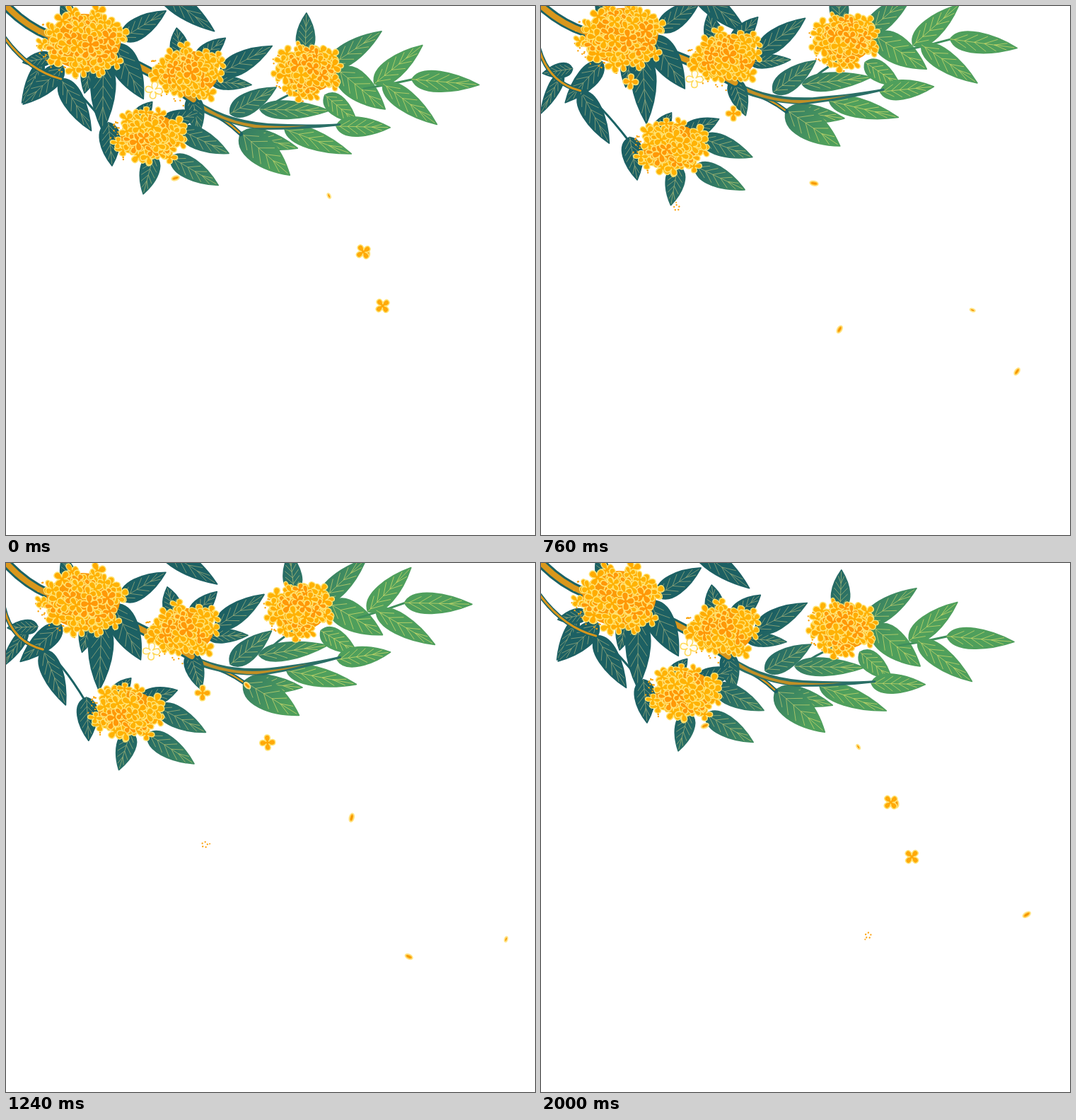
These frames come from a looping animation (748x748 px, 2.04 s). An HTML page:

```html
<!DOCTYPE html>
<html lang="en">
<head>
<meta charset="utf-8">
<title>Osmanthus</title>
<style>
html, body { margin: 0; width: 100%; height: 100%; overflow: hidden; background: #fff; }
svg { display: block; width: 100vw; height: 100vh; }
</style>
</head>
<body>
<svg id="stage" viewBox="0 0 748 748">
  <defs>
    <linearGradient id="leaf" gradientUnits="userSpaceOnUse" x1="200" y1="200" x2="305" y2="305">
      <stop offset="0" stop-color="#1c6063"/>
      <stop offset=".4" stop-color="#2e7465"/>
      <stop offset="1" stop-color="#4f9f5c"/>
    </linearGradient>
    <linearGradient id="vein" gradientUnits="userSpaceOnUse" x1="200" y1="200" x2="305" y2="305">
      <stop offset="0" stop-color="#91a578"/>
      <stop offset="1" stop-color="#c3d568"/>
    </linearGradient>
  </defs>
</svg>
<script>
const LOOP = 2040, STEP = 40, SWAY = 2000, SPIN = .18;
const TEAL = '#1b6264', GOLD = '#d9971c', PALE = '#ffe373', ORANGE = '#ffa908';
const RAD = Math.PI / 180;
const stage = document.getElementById('stage');

function add(parent, tag, attrs = {}) {
  const el = document.createElementNS('http://www.w3.org/2000/svg', tag);
  for (const k in attrs) el.setAttribute(k, attrs[k]);
  return parent.appendChild(el);
}

let seed = 7;
function rand(low = 0, high = 1) {
  seed = (seed * 16807) % 2147483647;
  return low + (high - low) * seed / 2147483647;
}

// Each joint turns by mean + swing * wave; a child's pivot rides on its parent.
// The growing phase makes the sway travel out along the branch.
const joints = {
  top: { x: 215, y: -25, mean: 0, swing: 4.8, phase: 85 },
  bough: { x: 0, y: 0, mean: -1.25, swing: 4.3, phase: 280 },
  middle: { parent: 'bough', x: 208, y: 121, mean: -4.1, swing: 4.5, phase: 340 },
  right: { parent: 'middle', x: 264, y: 134, mean: -4.8, swing: 5, phase: 380 },
  tip: { parent: 'right', x: 516, y: 114, mean: -3, swing: 4.1, phase: 408 },
  end: { parent: 'tip', x: 573, y: 106, mean: .4, swing: 4.6, phase: 448 },
  twig: { x: 78, y: 103, mean: 3, swing: 5.5, phase: 240, slide: [14, -10.5, 10] },
  low: { x: 207, y: 181, mean: -1.1, swing: 5.3, phase: 280, slide: [17.5, -15, 35] }
};
const wave = (t, phase) => Math.cos(2 * Math.PI * t / SWAY - phase * RAD);

// Where a point of a joint's resting drawing is now.
function on(name, x, y) {
  const j = joints[name], c = Math.cos(j.angle * RAD), s = Math.sin(j.angle * RAD);
  const dx = x - j.x, dy = y - j.y;
  return [j.now[0] + dx * c - dy * s, j.now[1] + dx * s + dy * c];
}

function poseJoints(t) {
  for (const j of Object.values(joints)) {
    j.angle = j.mean + j.swing * wave(t, j.phase);
    j.now = j.parent ? on(j.parent, j.x, j.y) : [j.x, j.y];
    if (j.slide) {
      const [dx, dy, phase] = j.slide, k = wave(t, phase) - 1;
      j.now = [j.x + dx * k, j.y + dy * k];
    }
  }
}

const moving = [];
function layer(name) {
  const el = add(stage, 'g');
  moving.push([el, joints[name]]);
  return el;
}

function leaf(g, x1, y1, x2, y2, half) {
  const dx = x2 - x1, dy = y2 - y1, len = Math.hypot(dx, dy);
  const h = half || Math.min(15, len * .24);
  const at = (s, o) => `${(x1 + dx * s - dy / len * o).toFixed(1)} ${(y1 + dy * s + dx / len * o).toFixed(1)} `;
  const a = h * 1.55, b = h;
  add(g, 'path', {
    d: `M${at(0, 0)}C${at(.12, a)}${at(.64, b)}${at(1, 0)}C${at(.64, -b)}${at(.12, -a)}${at(0, 0)}Z`,
    fill: 'url(#leaf)', stroke: 'url(#leaf)', 'stroke-width': 1.8, 'stroke-linejoin': 'round'
  });
  let veins = `M${at(0, 0)}L${at(.96, 0)}`;
  for (let s = .06; s < .75; s += .15) {
    const o = h * .75 * Math.sin(Math.PI * (s + .17) ** .8);
    veins += `M${at(s + .19, o)}L${at(s, 0)}L${at(s + .19, -o)}`;
  }
  add(g, 'path', { d: veins, fill: 'none', stroke: 'url(#vein)', 'stroke-width': .8 });
}

function line(g, d, stroke, width) {
  return add(g, 'path', { d, fill: 'none', stroke, 'stroke-width': width, 'stroke-linecap': 'round' });
}

function flower(g, r, fill, transform = '', stroke = PALE) {
  const n = v => (v * r).toFixed(1);
  let d = '';
  for (let k = 0; k < 4; k++) {
    const c = Math.cos(k * Math.PI / 2), s = Math.sin(k * Math.PI / 2);
    const at = (x, y) => `${n(x * c - y * s)} ${n(x * s + y * c)} `;
    d += `${k ? 'L' : 'M'}${at(.17, -.17)}C${at(.5, -.46)}${at(1, -.42)}${at(1, 0)}C${at(1, .42)}${at(.5, .46)}${at(.17, .17)}`;
  }
  add(g, 'path', { d: d + 'Z', fill, stroke, 'stroke-width': 1.5, 'stroke-linejoin': 'round', transform });
}

function cluster(g, cx, cy, rx, ry, count) {
  add(g, 'ellipse', { cx, cy, rx: rx - 14, ry: ry - 14, fill: '#fb9a08' });
  for (let i = 0; i < 26; i++) {
    const a = rand(1.7, 3.7), k = rand(.8, 1.02);
    add(g, 'circle', { cx: cx + Math.cos(a) * rx * k, cy: cy + Math.sin(a) * ry * k, r: 1.2, fill: '#f9a20a' });
  }
  for (let i = count - 1; i >= 0; i--) {
    const a = i * 2.39996 + rand(0, .5), k = Math.sqrt((i + .5) / count);
    const x = cx + Math.cos(a) * (rx - 9) * k + rand(-4, 4);
    const y = cy + Math.sin(a) * (ry - 9) * k + rand(-4, 4);
    const fill = k < .7 && rand() < .5 ? '#ff9808' : rand() < .5 ? '#ffab00' : '#ffb205';
    flower(g, rand(10.5, 13.5), fill,
      `translate(${x.toFixed(1)} ${y.toFixed(1)}) rotate(${rand(0, 90).toFixed(0)}) scale(1 ${rand(.7, 1).toFixed(2)})`);
  }
}

// Scene, back to front. A leaf runs from its base to its tip.
leaf(layer('top'), 215, -25, 295, 35);

const right = layer('right');
leaf(right, 422, 68, 424, 12);
leaf(right, 455, 88, 530, 38);
leaf(right, 450, 128, 495, 167);
leaf(right, 468, 92, 535, 148, 20);
line(right, 'M362 150Q385 132 420 118', '#2e7465', 3);
leaf(right, 316, 154, 381, 117);
leaf(right, 358, 148, 456, 150, 13);
leaf(right, 332, 182, 411, 203, 13);
leaf(right, 331, 181, 400, 241, 21);
leaf(right, 393, 176, 487, 211, 14);
leaf(right, 466, 172, 542, 174, 14);

const tip = layer('tip');
line(tip, 'M505 119Q540 114 575 106', '#3f8f5c', 3);
leaf(tip, 520, 112, 588, 58);
leaf(tip, 532, 112, 608, 170);
leaf(layer('end'), 573, 106, 668, 113);

line(right, 'M280 148Q310 162 331 183', TEAL, 6);
line(right, 'M280 148Q310 162 329 181', GOLD, 2.5);
add(right, 'path', { d: 'M258 126Q300 162 370 168Q430 171 472 168V171Q420 177 360 177Q295 168 253 137Z', fill: '#2a6f66' });
add(right, 'path', { d: 'M262 131Q305 167 365 171Q395 173 425 171Q395 175 350 174Q295 164 258 135Z', fill: '#c08f26' });

const middle = layer('middle');
leaf(middle, 262, 128, 272, 182);
leaf(middle, 246, 75, 240, 33, 13);
leaf(middle, 268, 80, 309, 47);
leaf(middle, 288, 108, 346, 113, 10);
leaf(middle, 302, 97, 375, 58);

const stalk = line(stage, '', TEAL, 3);
const twig = layer('twig');
leaf(twig, 52, 78, 23, 137, 9);
leaf(twig, 66, 72, 24, 80);
leaf(twig, 78, 103, 121, 176);

const trunkBark = line(stage, '', TEAL, 14), trunkCore = line(stage, '', GOLD, 8);
const bough = layer('bough');
leaf(bough, 95, 35, 80, -12);
leaf(bough, 122, 75, 110, 124);
leaf(bough, 80, 86, 23, 139);
leaf(bough, 163, 48, 226, 9);
leaf(bough, 137, 78, 135, 178, 18);
leaf(bough, 152, 55, 193, 133, 20);
const twigBark = line(stage, '', TEAL, 6), twigCore = line(stage, '', GOLD, 3);

const bloom = layer('middle');
cluster(bloom, 257, 97, 56, 46, 32);
flower(bloom, 12, '#fffdf2', 'translate(208 121) rotate(10)', '#ffd95a');

const low = layer('low');
leaf(low, 185, 162, 210, 133, 11);
leaf(low, 222, 166, 276, 148);
leaf(low, 148, 162, 153, 223);
leaf(low, 212, 208, 197, 263);
leaf(low, 236, 211, 303, 251);
leaf(low, 248, 172, 318, 206);
cluster(low, 207, 181, 56, 45, 36);
cluster(right, 427, 93, 53, 45, 34);
cluster(layer('bough'), 110, 51, 66, 53, 46);

function petal(a, b) {
  return g => {
    add(g, 'ellipse', { rx: a, ry: b, fill: '#ffb01c', stroke: '#ffe58a', 'stroke-width': 1.8 });
    line(g, `M${-a * .4} 0H${a * .4}`, '#f09000', b * .5);
  };
}
function specks(g) {
  for (let k = 0; k < 5; k++) {
    const a = k * 2 * Math.PI / 5;
    add(g, 'circle', { cx: 3.8 * Math.cos(a), cy: 3.8 * Math.sin(a), r: 1.2, fill: '#fba516' });
  }
  add(g, 'circle', { cx: -6, cy: -4, r: 1, fill: '#fba516' });
}
const blossom = g => flower(g, 11, ORANGE);

// Pieces drift from a point with a speed per ms and a slight pull, turning all the while.
const falling = [
  { draw: petal(5.5, 3), birth: 960, life: 2030, from: [281.5, 111.5], speed: [.2128, .2203], angle: 95, turn: -1 },
  { draw: petal(3.8, 2), birth: 1400, life: 1880, from: [327.5, 132.5], speed: [.2019, .2125], angle: -50 },
  { draw: petal(5.6, 3.2), birth: 1640, life: 1860, from: [168.6, 103], speed: [.156, .375], pull: [.054, -.06], angle: 92 },
  { draw: petal(6, 3.2), birth: 100, life: 1900, from: [273, 72], speed: [.1465, .296], pull: [.0375, -.038], angle: 131, turn: -1 },
  { draw: specks, birth: 480, life: 1520, from: [149, 207.5], speed: [.141, .292], pull: [.043, -.054], angle: 0 },
  { draw: blossom, birth: 600, life: 2000, from: [74, 85], speed: [.334, .132], pull: [-.024, .035], angle: -24 },
  { draw: blossom, birth: 600, life: 1850, from: [239.5, 118], speed: [.2035, .2125], angle: -29 }
];
for (const piece of falling) {
  piece.el = add(stage, 'g');
  piece.draw(piece.el);
}

function drift({ el, birth, life, from, speed, pull = [0, 0], angle, turn = 1 }, t) {
  const age = (t - birth + LOOP) % LOOP;
  const [x, y] = from.map((v, i) => v + speed[i] * age + pull[i] * age * age / 1000);
  el.setAttribute('visibility', age <= life ? 'visible' : 'hidden');
  el.setAttribute('transform', `translate(${x} ${y}) rotate(${angle + turn * SPIN * age})`);
}

function render(time) {
  const t = Math.floor((time % LOOP) / STEP) * STEP;
  poseJoints(t);
  for (const [el, j] of moving) {
    el.setAttribute('transform', `translate(${j.now}) rotate(${j.angle}) translate(${-j.x} ${-j.y})`);
  }

  const trunk = `M${on('bough', -10, -12)}Q${on('bough', 20, 25)} ${on('bough', 60, 42)}`
    + `L${on('bough', 150, 70)}Q${on('middle', 205, 92)} ${on('right', 264, 134)}`;
  for (const el of [trunkBark, trunkCore]) el.setAttribute('d', trunk);

  const [x, y] = joints.twig.now;
  const stem = `M-4 ${42 + (y - 103) * .8}Q${x - 47} ${y - 12} ${x} ${y}`;
  for (const el of [twigBark, twigCore]) el.setAttribute('d', stem);
  stalk.setAttribute('d', `M${x} ${y}Q${x + 25} ${y + 15} ${on('low', 147, 168)}`);

  for (const piece of falling) drift(piece, t);
}

const start = performance.now();
function tick() {
  render(performance.now() - start);
  requestAnimationFrame(tick);
}
tick();
</script>
</body>
</html>
```
